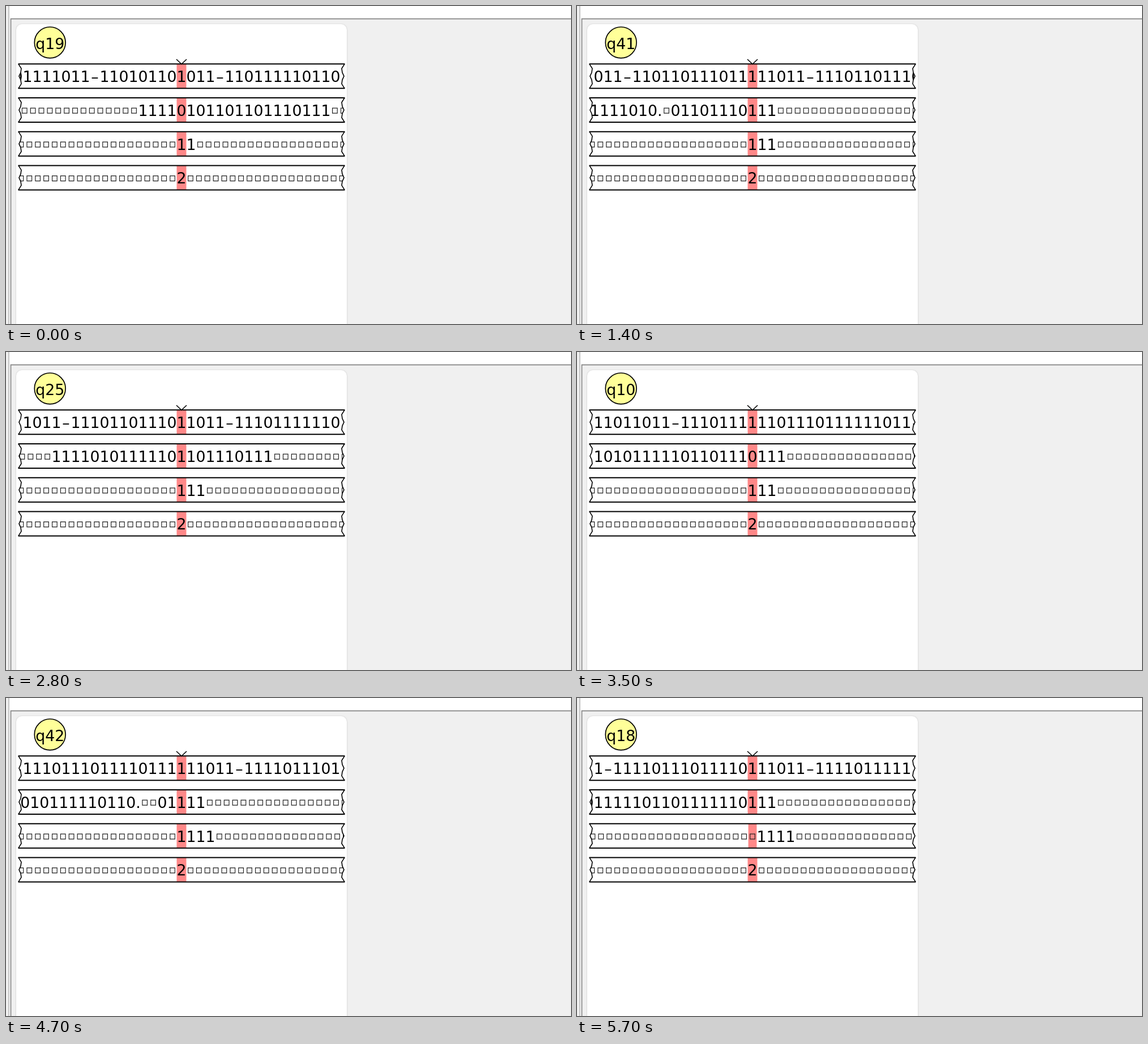
An HTML page for the animation above (5.8 s loop, 998 px wide and 561 px high).

```html
<!DOCTYPE html>
<html lang="en">
<head>
<meta charset="utf-8">
<title>Multi-tape Turing machine</title>
<style>
  html, body { margin: 0; width: 100%; height: 100%; overflow: hidden; background: #fff; }
  svg { display: block; width: 998px; height: 561px; }
  text { font: 26.75px "DejaVu Sans", Verdana, sans-serif; text-anchor: middle; white-space: pre; }
</style>
</head>
<body>
<svg id="stage" viewBox="0 0 998 561">
  <defs>
    <clipPath id="torn"><path id="tornShape"/></clipPath>
    <filter id="soft" x="-5%" y="-5%" width="110%" height="110%"><feGaussianBlur stdDeviation="1.3"/></filter>
  </defs>
  <rect width="998" height="561" fill="#fff"/>
  <rect width="5" height="561" fill="#f0f0f0"/>
  <path d="M5 0V561" stroke="#b8b8b8" stroke-width="1.6"/>
  <rect x="8" y="22" width="990" height="539" fill="#f0f0f0"/>
  <path d="M8.5 561V22.6H998" fill="none" stroke="#858585" stroke-width="1.7"/>
  <rect x="17.7" y="32" width="584.6" height="560" rx="10" fill="#ccc" filter="url(#soft)"/>
  <rect x="18" y="32" width="584" height="560" rx="10" fill="#fff"/>
  <circle cx="77.7" cy="64.4" r="27.4" fill="#ffff99" stroke="#000" stroke-width="1.7"/>
  <text id="state" x="77.7" y="76.2"></text>
  <g id="tapes"></g>
  <path d="M301 94L310 102.5L319 94" fill="none" stroke="#000" stroke-width="1.6"/>
</svg>
<script>
const BLANK = '□';
const LOOP = 5800, TICK = 100;
const HEAD_X = 310;

// ---- Rule tape: state, symbol, next state, written symbol, direction, all unary.
const rules = [[1,1,2,4,2], [2,1,2,1,2], [2,5,2,5,2], [2,2,3,5,2], [3,2,3,2,2],
               [3,6,3,6,2], [3,3,4,6,2], [4,3,4,3,2], [4,6,4,6,2]];
const unary = list => list.map(n => '1'.repeat(n)).join('0');
const ruleText = rules.map(unary);
const ruleStart = i => ruleText.slice(0, i).reduce((sum, r) => sum + r.length + 1, 0);
const program = ruleText.join('-');

// ---- Machine: runs once and records every step.
function runMachine() {
  const data = [...unary([4, 1, 2, 2, 3, 3])];
  let state = 2, shown = '11';
  let p = ruleStart(1) + 8, d = 4, s = 0;
  const trace = [];
  const cell = i => data[i] ?? BLANK;
  const log = q => trace.push({ q, p, d, s, data: data.join(''), shown });

  function rewindData(q) {
    while (cell(d - 1) === '1') { d--; log(q); }
  }

  function match() {
    while (program[p] === '1' && shown[s] === '1') { p++; s++; log(4); }
    const sameState = program[p] === '0' && s === shown.length;
    while (s > 0) { s--; log(6); }
    let found = false;
    if (sameState) {
      p++;
      log(10);
      while (program[p] === '1' && cell(d) === '1') { p++; d++; log(10); }
      found = program[p] === '0' && cell(d) !== '1';
      if (cell(d) !== '1') { d--; log(11); }
      rewindData(11);
    }
    if (!found) {
      while (program[p] !== '-') { p++; log(12); }
      p++;
      log(3);
    }
    return found;
  }

  function writeState(next) {
    p++;
    while (program[p] === '1') { p++; s++; log(16); }
    shown = '1'.repeat(state = next);
    s = next - 1;
    p++;
    while (s >= 0) { s--; log(18); }
    s = 0;
    d--;
    log(19);
  }

  function insertBlank() {
    const from = d;
    log(40);
    while (cell(d) !== BLANK) { d++; log(41); }
    for (let i = d - 1; i >= from; i--) {
      d = i; log(42);
      d = i + 1; data[d] = data[i]; log(43);
    }
    d = from;
  }

  function writeSymbol() {
    d++;
    log(25);
    for (let first = true; program[p] === '1'; first = false) {
      if (cell(d) !== '1') insertBlank();
      data[d] = first ? '.' : BLANK;
      d++; p++;
      log(27);
    }
    do { d--; data[d] = '1'; log(30); } while (cell(d - 1) === BLANK || cell(d - 1) === '.');
    while (cell(d) === '1') { d++; log(33); }
    d++;
    while (program[p] !== '-') { p++; log(34); }
    p++;
    log(3);
  }

  log(19);
  writeSymbol();
  for (let rule = 2; rule < 8; rule++) {
    if (!match()) continue;
    writeState(rules[rule][2]);
    if (rule < 7) writeSymbol();
  }
  return trace;
}

const trace = runMachine();

// ---- Timing: time, rule, offset in rule, state, data head.
const marks = [
  [0, 1, 8, 19, 4], [1200, 3, 10, 25, 7], [1400, 3, 12, 41, 17], [2000, 3, 14, 40, 11],
  [2400, 3, 15, 30, 7], [2800, 4, 11, 25, 13], [3500, 5, 7, 10, 19], [4200, 6, 13, 25, 16],
  [4700, 6, 16, 42, 21], [5400, 6, 19, 30, 16], [5700, 7, 14, 18, 23]
].map(([ms, rule, offset, q, d]) => {
  const p = ruleStart(rule) + offset;
  return { ms, step: trace.findLastIndex(t => t.p === p && t.q === q && t.d === d) };
});

function stepAt(ms) {
  const next = marks.findIndex(m => m.ms > ms);
  if (next < 0) return marks.at(-1).step;
  const a = marks[next - 1], b = marks[next];
  return Math.round(a.step + (b.step - a.step) * (ms - a.ms) / (b.ms - a.ms));
}

// ---- Drawing
const NS = 'http://www.w3.org/2000/svg';
const $ = id => document.getElementById(id);
function add(parent, tag, attrs) {
  const node = document.createElementNS(NS, tag);
  for (const key in attrs) node.setAttribute(key, attrs[key]);
  return parent.appendChild(node);
}

const edge = [[22, 0], [27, 8], [26, 15], [23, 21.5], [26, 28], [27, 35], [22, 43]];
const points = list => list.map(([x, y]) => x + ' ' + y).join('L');
const leftEdge = points(edge);
const rightEdge = points(edge.map(([x, y]) => [620 - x, y]).reverse());
$('tornShape').setAttribute('d', `M${leftEdge}L${rightEdge}Z`);

const rows = [0, 1, 2, 3].map(i => {
  const g = add($('tapes'), 'g', { transform: `translate(0 ${102.3 + i * 59.7})` });
  const mark = add(g, 'rect', { y: 0, height: 43, fill: '#ff8888' });
  const inner = add(g, 'g', { 'clip-path': 'url(#torn)' });
  const boxes = add(inner, 'path', { fill: 'none', stroke: '#222', 'stroke-width': 1.2 });
  const text = add(inner, 'text', { y: 32 });
  add(g, 'path', { d: `M${leftEdge}M${rightEdge}`, fill: 'none', stroke: '#000', 'stroke-width': 1.6 });
  add(g, 'path', { d: 'M21.5 0H598.5M21.5 43H598.5', stroke: '#000', 'stroke-width': 2 });
  return { mark, boxes, text };
});

const widthOf = c => c === BLANK ? 14.87 : c === '.' ? 8.6 : 17;

function drawTape(row, tape, head) {
  const at = i => tape[i] ?? BLANK;
  const headWidth = widthOf(at(head));
  const xs = [];
  let chars = '', boxes = '';
  const put = (c, x) => {
    if (c === BLANK) boxes += `M${(x - 4.3).toFixed(2)} 18.2h8.6v9h-8.6z`;
    else { chars += c === '-' ? '–' : c; xs.push(x.toFixed(2)); }
  };
  put(at(head), HEAD_X);
  for (const dir of [-1, 1]) {
    let reach = headWidth / 2;
    for (let i = head + dir; reach < 290; i += dir) {
      const w = widthOf(at(i));
      put(at(i), HEAD_X + dir * (reach + w / 2));
      reach += w;
    }
  }
  row.mark.setAttribute('x', HEAD_X - headWidth / 2);
  row.mark.setAttribute('width', headWidth);
  row.text.textContent = chars;
  row.text.setAttribute('x', xs.join(' '));
  row.boxes.setAttribute('d', boxes);
}

let drawn = -1;
function render(time) {
  const ms = Math.floor(time % LOOP / TICK) * TICK;
  if (ms === drawn) return;
  drawn = ms;
  const t = trace[stepAt(ms)];
  $('state').textContent = 'q' + t.q;
  drawTape(rows[0], program, t.p);
  drawTape(rows[1], t.data, t.d);
  drawTape(rows[2], t.shown, t.s);
  drawTape(rows[3], '2', 0);
}

const start = performance.now();
function loop() {
  render(performance.now() - start);
  requestAnimationFrame(loop);
}
loop();
</script>
</body>
</html>
```
